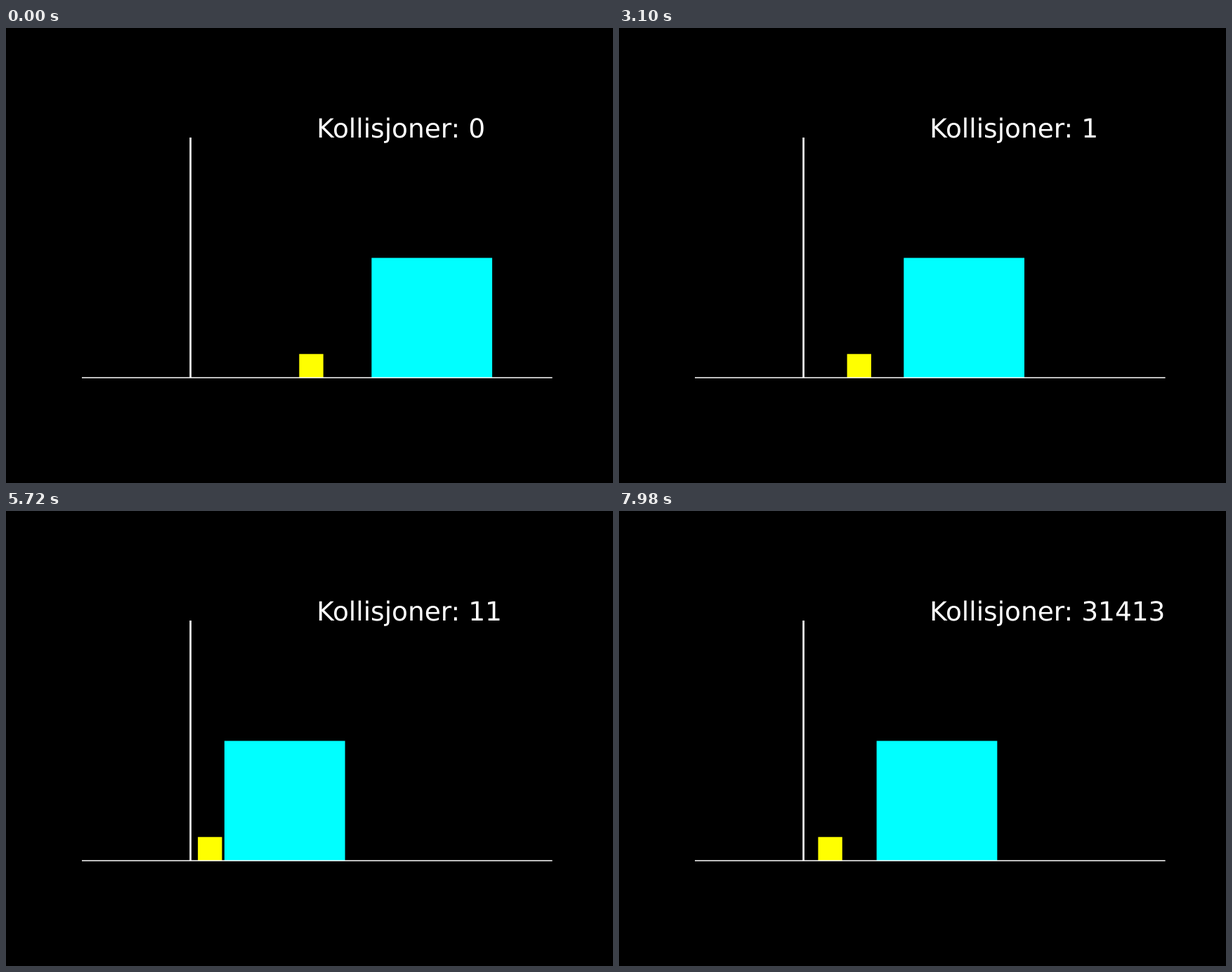
Animation, 864 px wide and 648 px high, one loop 8000 ms. Source, as an HTML page:

```html
<!DOCTYPE html>
<html lang="no">
<head>
<meta charset="utf-8">
<title>Kollisjoner</title>
<style>
  html, body { margin: 0; width: 100%; height: 100%; overflow: hidden; background: #000; }
  svg { display: block; width: 864px; height: 648px; }
  text { font: 37.5px "DejaVu Sans", sans-serif; fill: #fff; text-rendering: geometricPrecision; }
</style>
</head>
<body>
<svg viewBox="0 0 864 648">
  <rect id="small" y="464.3" width="34.338" height="33.8" fill="#ff0"/>
  <rect id="big" y="327.4" width="171.69" height="170.7" fill="#0ff"/>
  <path d="M108 498.1H777.6" stroke="#fff" stroke-width="1.5"/>
  <path d="M262.6 155.9V498" stroke="#fff" stroke-width="2.7"/>
  <text id="label" x="442.2" y="156.4"></text>
</svg>
<script>
const LOOP = 8000, WALL = 262.82, UNIT = 34.338;
const MASS_ROOT = 1e4;        // square root of the mass ratio
const WEDGE = 1 / MASS_ROOT;  // angle swept between two collisions
const START = 4.5;            // small block's first distance from the wall
const TURN = 6.5, TURN_DELAY = 0.026;

const [small, big, label] = ['small', 'big', 'label'].map(id => document.getElementById(id));

// Steps last 20, 100 and 20 ms in turn.
function stepAt(ms) {
  const rest = ms % 140;
  return Math.floor(ms / 140) * 3 + (rest < 20 ? 0 : rest < 120 ? 1 : 2);
}

// In mass-scaled coordinates the motion is a straight line folded into a wedge.
function stateAt(time) {
  const ahead = TURN - time;
  const gap = ahead > -0.01 ? Math.max(ahead, 0.0011) : ahead + TURN_DELAY;
  const turns = Math.atan2(START, gap * MASS_ROOT) / WEDGE;
  const count = Math.floor(turns);
  const part = turns - count;
  const angle = WEDGE * (count % 2 ? 1 - part : part);
  const radius = Math.hypot(gap * MASS_ROOT, START);
  return {
    count,
    smallX: radius * Math.sin(angle),
    bigX: 1 + radius * Math.cos(angle) / MASS_ROOT
  };
}

function draw() {
  const { count, smallX, bigX } = stateAt(stepAt(performance.now() % LOOP) * 0.05);
  small.setAttribute('x', WALL + smallX * UNIT);
  big.setAttribute('x', WALL + bigX * UNIT);
  label.textContent = 'Kollisjoner: ' + count;
  requestAnimationFrame(draw);
}
draw();
</script>
</body>
</html>
```
